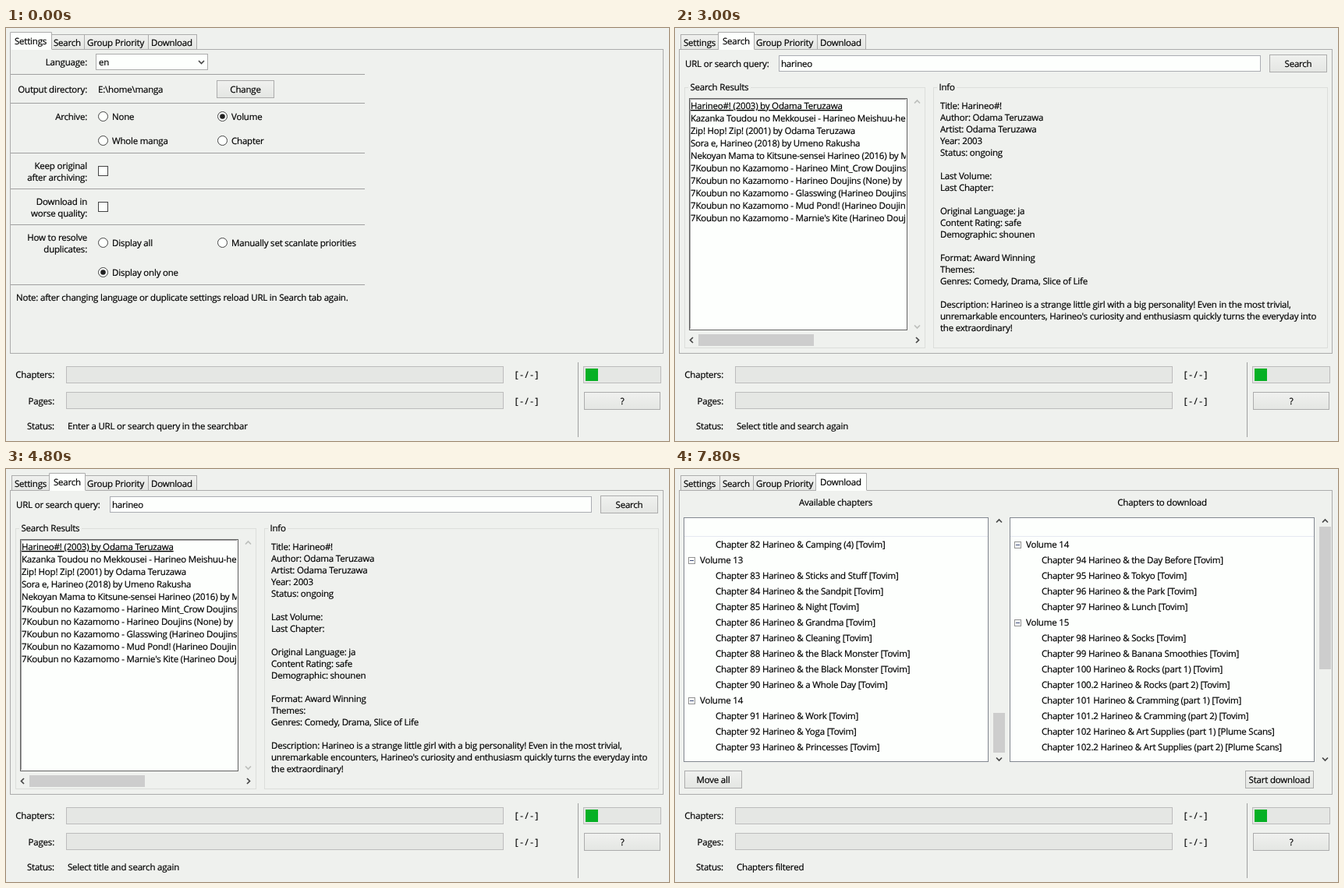
These frames come from a looping animation (850x530 px, 9 s). An HTML page:

```html
<!DOCTYPE html>
<html lang="en">
<head>
<meta charset="utf-8">
<title>Manga downloader</title>
<style>
  html, body { margin: 0; width: 850px; height: 530px; overflow: hidden; background: #eff1ee; }
  svg { display: block; }
  text {
    font: 11.5px "Open Sans", "Noto Sans", sans-serif;
    letter-spacing: -0.2px;
    text-rendering: geometricPrecision;
    white-space: pre;
    fill: #000;
    stroke: #000;
    stroke-width: .2px;
  }
</style>
</head>
<body>
<svg id="stage" width="850" height="530" viewBox="0 0 850 530"></svg>
<script>
const BG = '#eff1ee', WHITE = '#fdfffd', GREY = '#acacac', THUMB = '#cdcdcd', SHADE = 'url(#shade)';
const HOLD = 3000;

const esc = s => s.replace(/&/g, '&amp;').replace(/</g, '&lt;');
const text = (x, y, s, anchor = 'start', extra = '') =>
  `<text x="${x}" y="${y}" text-anchor="${anchor}" ${extra}>${esc(s)}</text>`;
const right = (x, y, s) => text(x, y, s, 'end');
const mid = (x, y, s) => text(x, y, s, 'middle');
const fill = (x, y, w, h, c) => `<rect x="${x}" y="${y}" width="${w}" height="${h}" fill="${c}"/>`;
const hline = (x1, x2, y, c) => fill(x1, y, x2 - x1, 1, c);

// One pixel frame whose edges lie on the given pixel columns and rows
const box = (x1, y1, x2, y2, bg, edge) =>
  `<rect x="${x1 + .5}" y="${y1 + .5}" width="${x2 - x1}" height="${y2 - y1}" fill="${bg}" stroke="${edge}"/>`;

const button = (x1, y1, x2, y2, s) =>
  box(x1, y1, x2, y2, SHADE, GREY) + mid((x1 + x2 + 1) / 2, y1 + 16, s);

const chevron = (x, y, angle, c = '#484848') =>
  `<path d="M-3.5 2L0 -1.5L3.5 2" transform="translate(${x} ${y}) rotate(${angle})" fill="none" stroke="${c}" stroke-width="1.7"/>`;

const radio = (x, y, s, on) =>
  `<circle cx="${x}" cy="${y}" r="6" fill="${WHITE}" stroke="#444"/>` +
  (on ? `<circle cx="${x}" cy="${y}" r="3.3" fill="#222"/>` : '') + text(x + 11.5, y + 4.5, s);

const check = y => box(118, y, 130, y + 12, WHITE, '#444');

const bar = (x1, x2, y) => box(x1, y, x2, y + 21, '#e5e7e4', '#bcbcbc');

const status = s => text(79, 515, s);

const TABS = [['Settings', 7, 57, 11], ['Search', 57, 100, 61],
              ['Group Priority', 100, 182, 104], ['Download', 182, 244, 186]];

function tabs(active) {
  const draw = ([name, x1, x2, tx], on) => on
    ? fill(x1 - 2, 5, x2 - x1 + 4, 23, WHITE) +
      `<path d="M${x1 - 1.5} 28V5.5H${x2 + 1.5}V27.5" fill="none" stroke="${GREY}"/>` + text(tx, 21, name)
    : box(x1, 8, x2, 27, SHADE, GREY) + text(tx, 23, name);
  return TABS.map((t, i) => i === active ? '' : draw(t, false)).join('') + draw(TABS[active], true);
}

function settings() {
  const labels = [[48, 'Language:'], [83, 'Output directory:'], [118, 'Archive:'],
    [181, 'Keep original'], [196, 'after archiving:'], [227, 'Download in'], [242, 'worse quality:'],
    [273, 'How to resolve'], [288, 'duplicates:']];
  return tabs(0) +
    labels.map(([y, s]) => right(104, y, s)).join('') +
    [59, 96, 160, 206, 252, 329].map(y => hline(6, 460, y, '#a0a0a0')).join('') +
    box(115, 33, 258, 53, WHITE, GREY) + text(119, 48, 'en') + chevron(250.5, 44, 180) +
    text(118, 83, 'E:\\home\\manga') + button(270, 67, 343, 89, 'Change') +
    radio(124.5, 113.5, 'None') + radio(277.5, 113.5, 'Volume', true) +
    radio(124.5, 144.5, 'Whole manga') + radio(277.5, 144.5, 'Chapter') +
    check(177) + check(223) +
    radio(124.5, 275.5, 'Display all') + radio(277.5, 275.5, 'Manually set scanlate priorities') +
    radio(124.5, 313.5, 'Display only one', true) +
    text(13, 350, 'Note: after changing language or duplicate settings reload URL in Search tab again.') +
    status('Enter a URL or search query in the searchbar');
}

const HERO = 'Harineo', AUTHOR = 'Odama Teruzawa', SERIES = '7Koubun no Kazamomo - ';

const RESULTS = [
  `${HERO}#! (2003) by ${AUTHOR}`,
  `Kazanka Toudou no Mekkousei - ${HERO} Meishuu-hen`,
  `Zip! Hop! Zip! (2001) by ${AUTHOR}`,
  `Sora e, ${HERO} (2018) by Umeno Rakusha`,
  `Nekoyan Mama to Kitsune-sensei ${HERO} (2016) by Minase`,
  `${SERIES}${HERO} Mint_Crow Doujinshi`,
  `${SERIES}${HERO} Doujins (None) by`,
  `${SERIES}Glasswing (${HERO} Doujins)`,
  `${SERIES}Mud Pond! (${HERO} Doujins)`,
  `${SERIES}Marnie's Kite (${HERO} Doujins)`
];

const INFO = [
  `Title: ${HERO}#!`, `Author: ${AUTHOR}`, `Artist: ${AUTHOR}`, 'Year: 2003', 'Status: ongoing', '',
  'Last Volume:', 'Last Chapter:', '',
  'Original Language: ja', 'Content Rating: safe', 'Demographic: shounen', '',
  'Format: Award Winning', 'Themes:', 'Genres: Comedy, Drama, Slice of Life', '',
  `Description: ${HERO} is a strange little girl with a big personality! Even in the most trivial,`,
  `unremarkable encounters, ${HERO}'s curiosity and enthusiasm quickly turns the everyday into`,
  'the extraordinary!'
];

function group(x1, x2, s, gap) {
  return box(x1, 76, x2, 410, 'none', '#dcdedb') + fill(x1 + 5, 75, gap, 3, BG) + text(x1 + 7.5, 80, s);
}

function search() {
  return tabs(1) +
    text(13, 50, 'URL or search query:') +
    box(133, 35, 750, 55, WHITE, '#abadb3') + text(136, 50, HERO.toLowerCase()) +
    button(762, 34, 835, 56, 'Search') +
    group(12, 320, 'Search Results', 80) + group(331, 836, 'Info', 25) +
    box(18, 90, 297, 387, WHITE, '#646464') +
    '<path d="M19.5 386V91.5H296" fill="none" stroke="#a0a0a0"/>' +
    '<clipPath id="list"><rect x="20" y="92" width="276" height="294"/></clipPath><g clip-path="url(#list)">' +
    RESULTS.map((s, i) => text(20, 104 + 16 * i, s, 'start', i ? '' : 'text-decoration="underline"')).join('') +
    '</g>' +
    chevron(310.5, 94.5, 0, '#bcbebb') + chevron(310.5, 383.5, 180, '#bcbebb') +
    chevron(21, 400.5, -90) + chevron(311, 400.5, 90) + fill(30, 393, 148, 15, THUMB) +
    INFO.map((s, i) => text(340, 104 + 15 * i, s)).join('') +
    status('Select title and search again');
}

const GROUP = 'Tovim', OTHER = 'Plume Scans';
const ch = (n, s, by = GROUP) => `Chapter ${n} ${HERO} & ${s} [${by}]`;

const LEFT = [
  ch(82, 'Camping (4)'), 'Volume 13',
  ch(83, 'Sticks and Stuff'), ch(84, 'the Sandpit'), ch(85, 'Night'), ch(86, 'Grandma'), ch(87, 'Cleaning'),
  ch(88, 'the Black Monster'), ch(89, 'the Black Monster'), ch(90, 'a Whole Day'), 'Volume 14',
  ch(91, 'Work'), ch(92, 'Yoga'), ch(93, 'Princesses')
];
const RIGHT = [
  'Volume 14', ch(94, 'the Day Before'), ch(95, 'Tokyo'), ch(96, 'the Park'), ch(97, 'Lunch'),
  'Volume 15', ch(98, 'Socks'), ch(99, 'Banana Smoothies'),
  ch(100, 'Rocks (part 1)'), ch('100.2', 'Rocks (part 2)'),
  ch(101, 'Cramming (part 1)'), ch('101.2', 'Cramming (part 2)'),
  ch(102, 'Art Supplies (part 1)', OTHER), ch('102.2', 'Art Supplies (part 2)', OTHER)
];

function tree(x, rows, thumbY, thumbH) {
  const row = (s, i) => {
    const y = 101 + 20 * i;
    if (s.startsWith('Chapter')) return text(x + 41, y, s);
    return box(x + 6, y - 8, x + 14, y, WHITE, '#919191') +
      hline(x + 8, x + 13, y - 4, '#3c4a78') + text(x + 21, y, s);
  };
  return box(x, 62, x + 390, 375, WHITE, '#828790') + hline(x + 1, x + 390, 86, '#e6e9f1') +
    rows.map(row).join('') +
    chevron(x + 404.5, 66.5, 0) + chevron(x + 404.5, 372.5, 180) +
    fill(x + 397, thumbY, 15, thumbH, THUMB);
}

function download() {
  return tabs(3) +
    mid(206, 47, 'Available chapters') + mid(624.5, 47, 'Chapters to download') +
    tree(11, LEFT, 313, 51) + tree(429, RIGHT, 74, 183) +
    button(12, 387, 85, 409, 'Move all') + button(731, 387, 818, 409, 'Start download') +
    status('Chapters filtered');
}

const shade = '<defs><linearGradient id="shade" x2="0" y2="1">' +
  '<stop stop-color="#f0f1ef"/><stop offset="1" stop-color="#e4e6e3"/></linearGradient></defs>';

const frame = box(5, 27, 842, 417, BG, GREY) +
  right(62, 449, 'Chapters:') + right(62, 483, 'Pages:') + right(62, 515, 'Status:') +
  bar(77, 637, 434) + bar(77, 637, 467) +
  mid(667.5, 449, '[ - / - ]') + mid(667.5, 483, '[ - / - ]') +
  fill(733, 429, 1, 96, '#a0a0a0') +
  bar(740, 839, 434) + fill(743, 437, 16, 16, '#06b025') +
  button(741, 467, 838, 489, '?');

const stage = document.getElementById('stage');
stage.innerHTML = shade + frame +
  [settings, search, download].map(f => `<g display="none">${f()}</g>`).join('');
const pages = [...stage.children].filter(e => e.tagName === 'g');

function render(t) {
  const now = Math.floor(t / HOLD) % pages.length;
  pages.forEach((p, i) => p.setAttribute('display', i === now ? 'inline' : 'none'));
}

const start = performance.now();
function tick() {
  render(performance.now() - start);
  requestAnimationFrame(tick);
}
tick();
</script>
</body>
</html>
```
